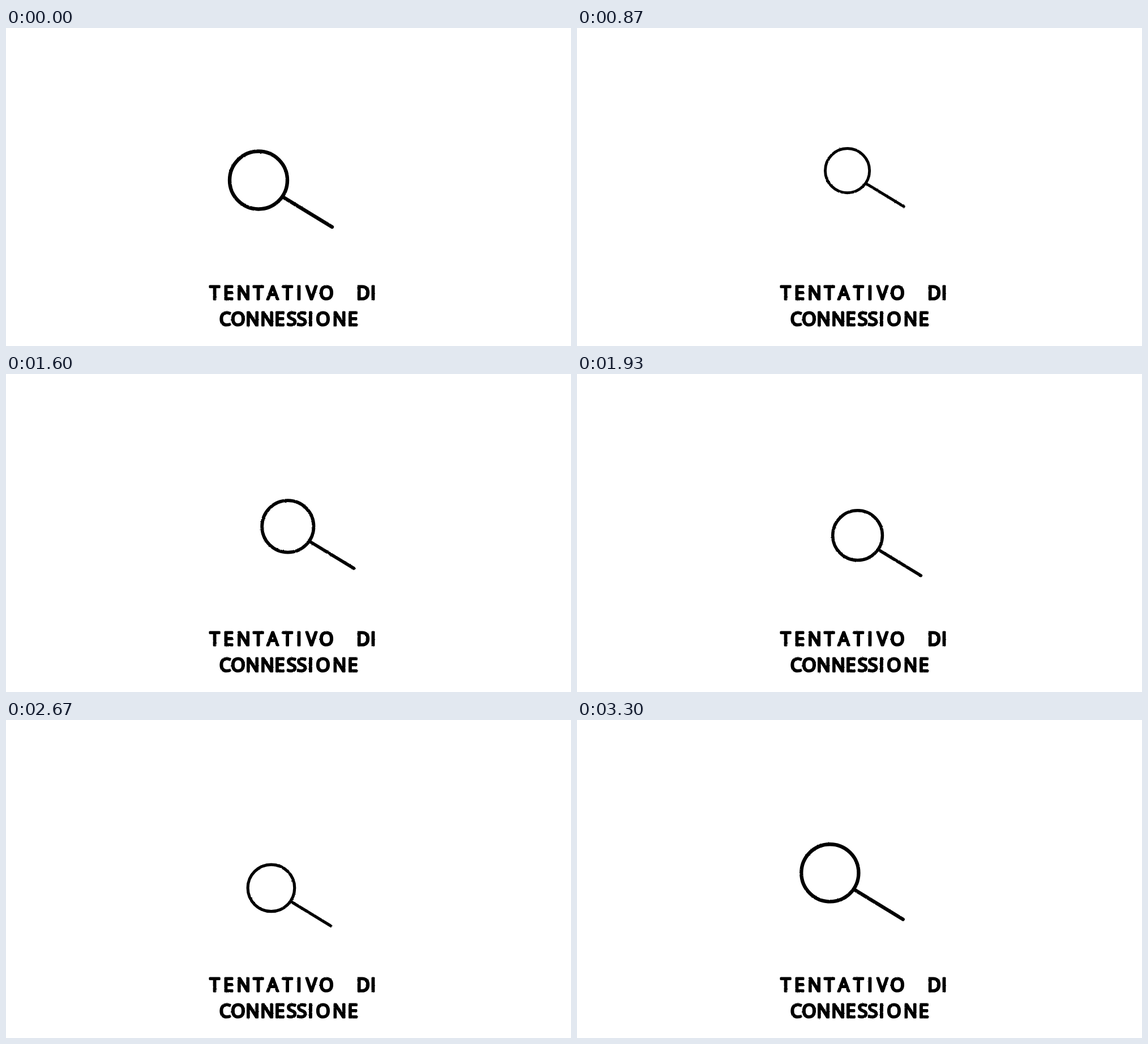
Animation of 998x561 px, one loop 3330 ms. Source, as an HTML page without scripts:

```html
<!DOCTYPE html>
<html lang="it">
<head>
<meta charset="utf-8">
<title>Tentativo di connessione</title>
<style>
  html, body { margin: 0; width: 100%; height: 100%; overflow: hidden; background: #fff; }
  svg { display: block; width: 100%; height: 100%; }
  .ink { stroke: #000; stroke-linecap: round; stroke-linejoin: round; }
  .glass { fill: none; stroke-width: 6.4; }
  .caption { font: 400 32px "Open Sans", "Noto Sans", sans-serif; text-anchor: middle; stroke-width: 3.2; }
</style>
</head>
<body>
<svg viewBox="0 0 998 561">
  <defs>
    <filter id="rough" filterUnits="userSpaceOnUse" x="0" y="0" width="998" height="561" color-interpolation-filters="sRGB">
      <feTurbulence type="fractalNoise" baseFrequency="0.3" numOctaves="2" seed="4"/>
      <feDisplacementMap in="SourceGraphic" scale="2" xChannelSelector="R" yChannelSelector="G"/>
    </filter>
  </defs>

  <g filter="url(#rough)">
    <!-- The lens circles once per loop and shrinks twice. -->
    <g>
      <animateMotion dur="3.33s" repeatCount="indefinite" calcMode="linear"
        keyTimes="0;.25;.5;.75;1" keyPoints="0;.244;.496;.75;1"
        path="M460.3 298.5C460.3 298.5 475.5 274.6 486.6 274.6C500 274.6 510.8 285 510.8 298.3C510.8 312 500.5 323.7 487.5 323.7C477 323.7 460.3 298.5 460.3 298.5"/>
      <g class="ink glass">
        <animateTransform attributeName="transform" type="scale" dur="3.33s" repeatCount="indefinite"
          values="1;.76;.907;.76;1"/>
        <circle cx="-14.3" cy="-30" r="51"/>
        <path d="M28.7 -.5L115.7 52.5"/>
      </g>
    </g>

    <g class="ink caption">
      <text y="479.3" x="368.5 393 419.5 445.5 471 497 517.5 539.5 566 600 631 648.5">TENTATIVO DI</text>
      <text y="525" x="387 410 435.5 461.5 483.5 504.5 522.5 538 560 589 612.5">CONNESSIONE</text>
    </g>
  </g>
</svg>
</body>
</html>
```
